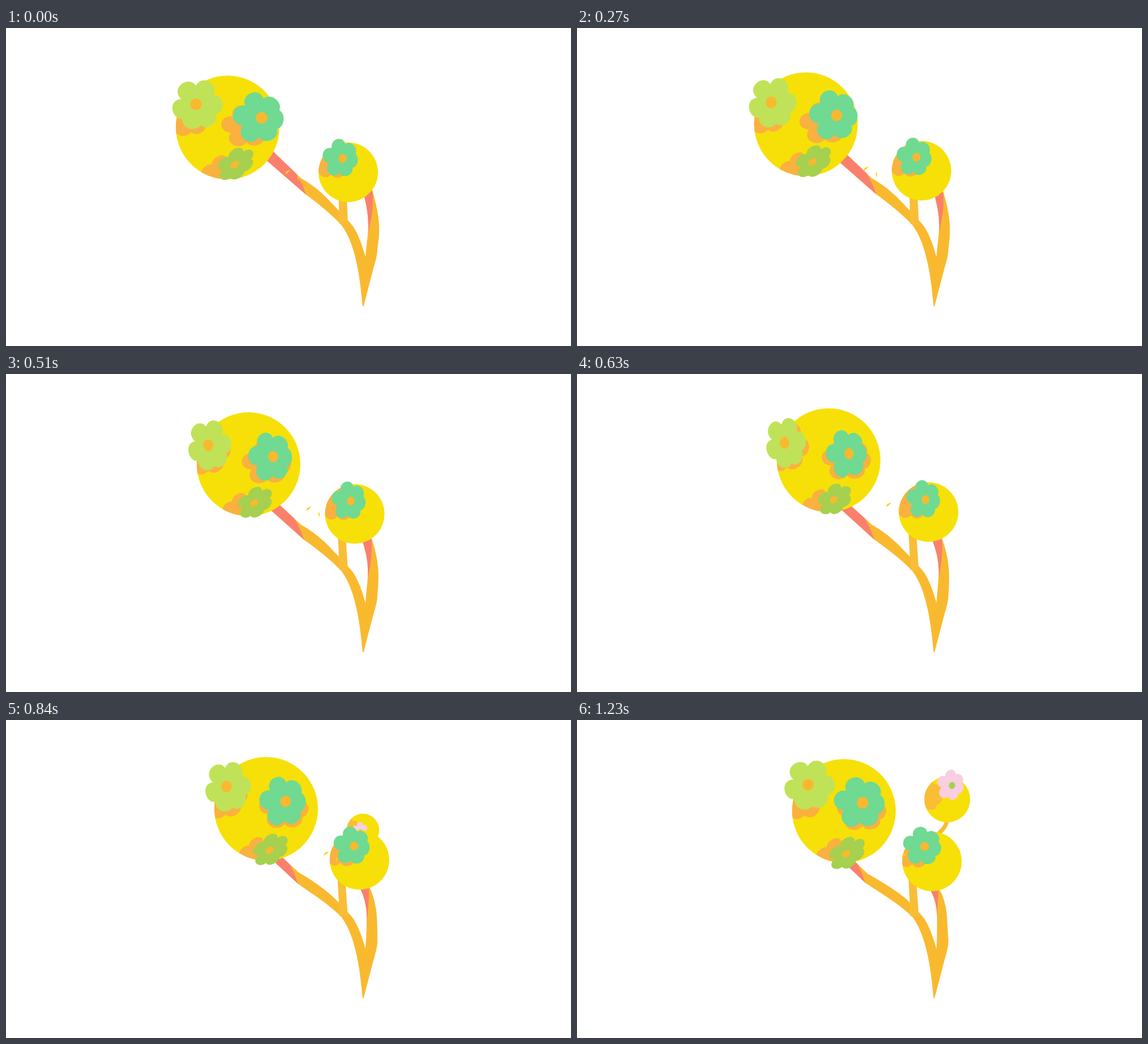
These frames come from a looping animation (998 px wide and 561 px high, 1.29 s). An HTML page with a canvas:

```html
<!DOCTYPE html>
<html>
<head>
<meta charset="utf-8">
<style>
html, body { margin: 0; width: 100%; height: 100%; overflow: hidden; background: #fff }
canvas { display: block }
</style>
</head>
<body>
<canvas id="stage" width="998" height="561"></canvas>
<script>
const ctx = document.getElementById('stage').getContext('2d');
const YELLOW = '#f7e007', STEM = '#f9b92f', PALE = '#f9be36', SHADE = '#f9b13f',
      CORAL = '#fa806d', LIME = '#c0e258', TEAL = '#70d992', OLIVE = '#a6d04f', PINK = '#f9cee0';
const LOOP = 1290, LAST = 22, HALF = LAST / 2, POWER = 1.8;

// Petal directions clockwise from up; lean lengthens the right side
const WIDE = { angles: [-33, 32, 92, 142, 193, 252], lean: 2.5 };
const TALL = { angles: [-25, 36, 96, 157, 218, 277], lean: -6 };
const PETAL = new Path2D('M0 0C-10-10-20-20-17-33C-13-49 13-49 17-33C20-20 10-10 0 0Z');

let phase = 0;   // 0 at the left, 1 at the turning point, 2 at rest

// Steps last 60 ms, with a 30 ms one every eighth
const stepStart = i => 60 * i - 30 * Math.floor((i + 3) / 8);
const mix = (a, b, u) => a + (b - a) * u;

// Speeds up towards the turning point, then slows down to rest
const pose = (left, turn, rest) => phase < 1
  ? mix(left, turn, phase ** POWER)
  : mix(rest, turn, (2 - phase) ** POWER);

function fill(color, path) {
  ctx.fillStyle = color;
  ctx.fill(new Path2D(path));
}
function disc(x, y, r, color) {
  ctx.fillStyle = color;
  ctx.beginPath();
  ctx.arc(x, y, r, 0, 7);
  ctx.fill();
}
function flower({ angles, lean }, x, y, sx, sy, turn, color, heart) {
  ctx.save();
  ctx.translate(x, y);
  ctx.rotate(turn);
  ctx.scale(sx, sy);
  ctx.fillStyle = color;
  for (const degrees of angles) {
    const angle = degrees * Math.PI / 180;
    ctx.save();
    ctx.rotate(angle);
    ctx.scale(1, 1 + lean * Math.sin(angle) / 45);
    ctx.fill(PETAL);
    ctx.restore();
  }
  if (heart) disc(0, 0, 10.3, heart);
  ctx.restore();
}
function bulb(x, y, r, drawShadows) {
  disc(x, y, r, YELLOW);
  ctx.save();
  ctx.beginPath();
  ctx.arc(x, y, r, 0, 7);
  ctx.clip();
  drawShadows();
  ctx.restore();
}

function drawStems() {
  // Left branch: lower and upper end, then the lower and upper bend
  const lx = pose(455, 461, 469), ly = pose(229, 234, 249);
  const ux = pose(468, 479, 484), uy = pose(214, 228, 243);
  const mx = pose(530, 525, 509), my = pose(294, 292, 287);
  const nx = pose(521, 521, 513), ny = pose(265, 266, 271);
  // Right branch: outer and inner edge
  const topY = pose(283, 289, 298);
  const outX = pose(646, 644, 639), outKnee = pose(659, 657, 653.5);
  const inX = pose(629, 626, 623), inKnee = pose(640, 639, 636);

  fill(STEM, `M${lx} ${ly}L${mx} ${my}C${mx + 14} ${my + 10} 571 325 592 347
    C608 368 623 405 630 491H631.5L649 424C654 408 656 398 656 390
    Q${outKnee + 1} 365 ${outKnee} 348C${outKnee - 1} 328 ${outX + 7} 306 ${outX} ${topY}
    H${inX}Q${inKnee} 320 ${inKnee} 348C${inKnee} 365 636 385 635 404
    C629 382 620 357 609 345L587 321C572 306 ${nx + 35} ${ny + 20} ${nx} ${ny}L${ux} ${uy}Z`);

  const q = pose(.85, .7, .4);
  const cx = mix(ux, nx, q), cy = mix(uy, ny, q);
  fill(CORAL, `M${lx} ${ly}L${mx} ${my}Q${mix(cx, mx, .55)} ${mix(cy, my, .4)} ${cx} ${cy}L${ux} ${uy}Z`);
  fill(CORAL, `M${inX} ${topY}H${outX}Q${pose(652, 648, 637)} 312 ${inKnee} 360
    V348Q${inKnee} 320 ${inX} ${topY}Z`);

  const paleX = pose(587, 585.5, 585.5);
  fill(PALE, `M${paleX} 280H${paleX + 14}Q${paleX + 16} 320 604 346H589Q588 320 ${paleX} 280Z`);
}

// Grows out from behind the small bulb and swings right before it settles
function drawSprout(u) {
  const x = mix(615, 654, u) + 9 * Math.sin(Math.PI * u ** 3);
  const y = mix(225, 140, u), r = mix(22, 40.5, u), size = mix(.22, .6, u);
  ctx.strokeStyle = STEM;
  ctx.lineWidth = 7;
  ctx.stroke(new Path2D(`M634 204Q${x - 3} 192 ${x} ${y + r - 4}`));
  bulb(x, y, r, () => flower(TALL, x - .77 * r, y - .17 * r, size, size, .25, PALE));
  flower(TALL, x - 6 + 14.5 * u * u, y + mix(18, -24.5, u), size * .88, size, .25, PINK, OLIVE);
}

function drawSmallBulb(drawChips) {
  const x = pose(594.5, 615.5, 614), y = pose(230, 221.5, 223);
  bulb(pose(604.5, 621, 627), pose(254.5, 243.5, 249.5), 52.5,
    () => flower(TALL, x + pose(-14, -20, -16), y + pose(3, 2, 6), .74, .75, .1, SHADE));
  drawChips();
  flower(TALL, x, y, pose(.7, .665, .755), .75, .1, TEAL, STEM);
}

function drawBigBulb(x, y) {
  const ax = pose(335.5, 366.5, 408), ay = pose(134.5, 121.5, 114);
  const bx = pose(451.5, 480.5, 504.5), by = pose(158.5, 140.5, 146);
  const cx = pose(404, 453.5, 475.5), cy = pose(241, 222, 236);
  const cSize = pose(.83, .75, .82), tilt = -.65;
  bulb(x, y, 91.5, () => {
    flower(WIDE, ax + pose(-17, -4, -15), ay + pose(12, 6, 17), 1, 1, 0, SHADE);
    flower(TALL, bx + pose(-22, 1, 4), by + pose(15, 10, 13), .97, .83, 0, SHADE);
    flower(WIDE, cx + pose(-30, -28, -24), cy + pose(13, 10, 2), cSize, .53, tilt, SHADE);
  });
  flower(WIDE, ax, ay, pose(1, .8, 1), 1, pose(0, -.16, 0), LIME, STEM);
  flower(TALL, bx, by, pose(1, .8, 1), pose(1, .95, 1), pose(0, -.12, 0), TEAL, STEM);
  flower(WIDE, cx, cy, cSize, .54, tilt, OLIVE, STEM);
}

function draw(now) {
  const time = now % LOOP;
  let step = LAST;
  while (stepStart(step) > time) step--;
  phase = step / HALF;
  ctx.fillStyle = '#fff';
  ctx.fillRect(0, 0, 998, 561);

  const x = pose(391.5, 444.5, 471.5), y = pose(175.5, 152, 160.5);
  drawStems();
  if (phase > 1) drawSprout(phase - 1);
  // Loose chips travel with the big bulb
  drawSmallBulb(() => {
    ctx.save();
    ctx.translate(x, y);
    fill('#f7d41c', 'M102 83L103 78Q107 75 111 75L107 79ZM123 84L126 87L124.5 95Z');
    ctx.restore();
  });
  drawBigBulb(x, y);
  requestAnimationFrame(draw);
}
requestAnimationFrame(draw);
</script>
</body>
</html>
```
